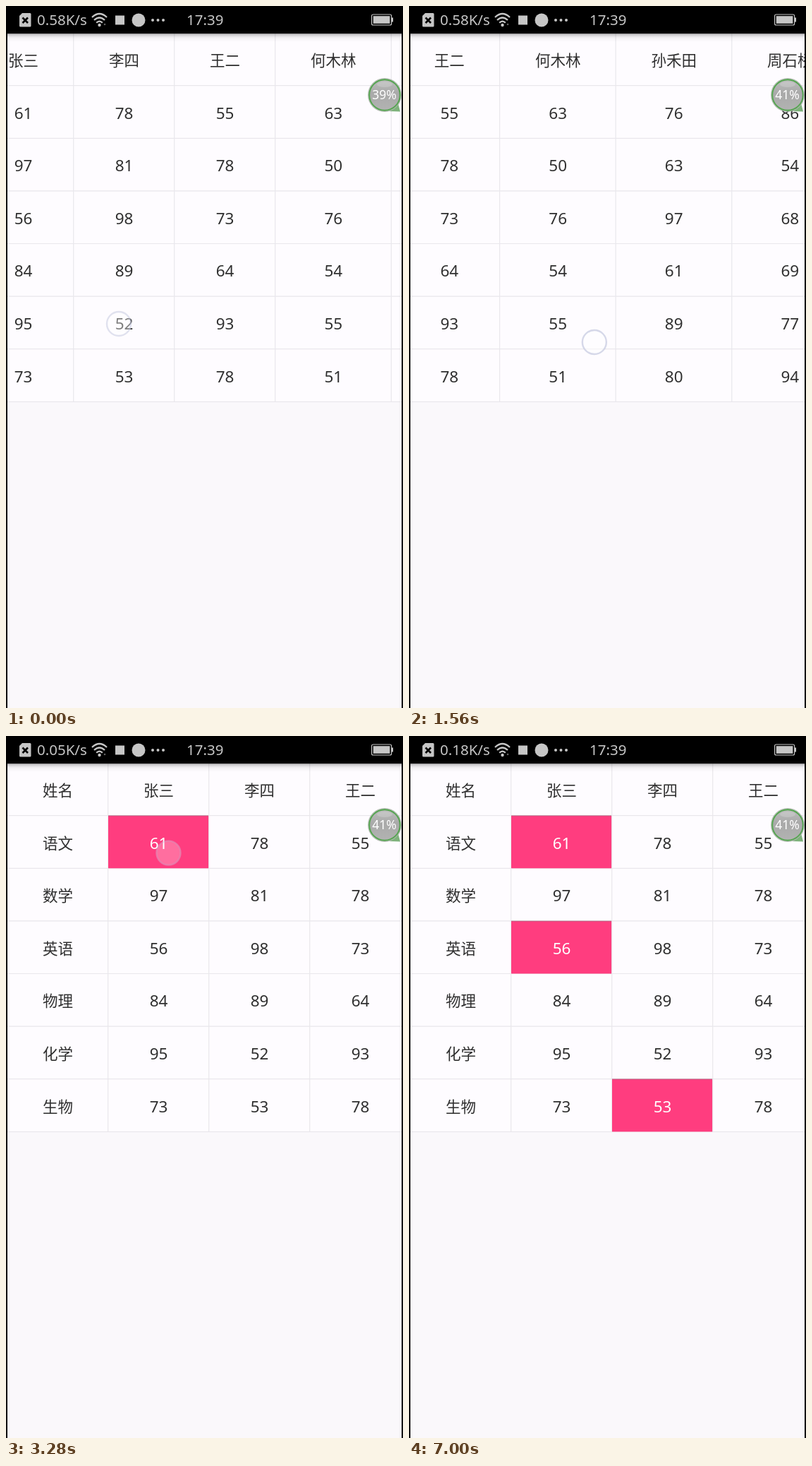
These frames come from a looping animation (563 px wide and 994 px high, 7.04 s). An HTML page:

```html
<!DOCTYPE html>
<html lang="zh-CN">
<head>
<meta charset="utf-8">
<title>成绩表</title>
<style>
  html, body { margin: 0; width: 100%; height: 100%; overflow: hidden; background: #000; }
  svg { display: block; width: 100%; height: 100%; }
  text { font-family: "Noto Sans", "Noto Sans CJK SC", sans-serif; font-weight: 300; }
  .zh { font-family: "Noto Sans CJK SC", "Noto Sans CJK", sans-serif; font-size: 21.5px; }
  .num { font-size: 22.5px; }
  .status { font-size: 20.5px; fill: #c6c6c6; }
</style>
</head>
<body>
<svg viewBox="0 0 563 994" preserveAspectRatio="none">
  <defs>
    <linearGradient id="shade" x1="0" y1="0" x2="0" y2="1">
      <stop offset="0" stop-color="#000" stop-opacity=".38"/>
      <stop offset=".2" stop-color="#000" stop-opacity=".16"/>
      <stop offset=".5" stop-color="#000" stop-opacity=".05"/>
      <stop offset="1" stop-color="#000" stop-opacity="0"/>
    </linearGradient>
    <linearGradient id="ball" x1="0" y1="0" x2="0" y2="1">
      <stop offset="0" stop-color="#bcbcbc"/>
      <stop offset=".45" stop-color="#a8a8a8"/>
      <stop offset="1" stop-color="#b2b2b2"/>
    </linearGradient>
    <clipPath id="page"><rect x="2" y="39" width="559" height="955"/></clipPath>
  </defs>
  <rect width="563" height="994"/>
  <g clip-path="url(#page)">
    <rect x="2" y="39" width="559" height="955" fill="#faf8fb"/>
    <g id="table"></g>
    <rect x="2" y="39" width="559" height="12" fill="url(#shade)"/>
    <g id="touch">
      <circle r="17" fill="#fff" fill-opacity=".5"/>
      <circle r="17" fill="none" stroke="#c9cce2" stroke-opacity=".75" stroke-width="2.4"/>
    </g>
  </g>

  <path d="M543 149Q552 145 556 138L559 149.500Z" fill="#7db27a"/>
  <circle cx="537" cy="126" r="24" fill="#acb4ab" fill-opacity=".85"/>
  <circle cx="537" cy="126" r="21.800" fill="url(#ball)" fill-opacity=".92" stroke="#55a550" stroke-width="1.900"/>
  <ellipse cx="537" cy="111" rx="11" ry="4" fill="#fff" fill-opacity=".18"/>
  <text id="percent" x="536.500" y="132.300" text-anchor="middle" font-size="17.500" fill="#fff"></text>

  <g fill="#c6c6c6">
    <path d="M23 10H34Q35.500 10 35.500 11.500V28Q35.500 29.500 34 29.500H20.500Q19 29.500 19 28V14Z"/>
    <path d="M23.500 16.500L31 24M31 16.500L23.500 24" stroke="#000" stroke-width="2.600"/>
    <path d="M122 16Q132.500 6 143 16M125 20Q132.500 13 140 20M128.200 23.800Q132.500 19.500 136.800 23.800"
      fill="none" stroke="#c6c6c6" stroke-width="2.300"/>
    <circle cx="132.500" cy="27" r="2.200"/>
    <circle cx="140" cy="26" r="1.300" opacity=".5"/>
    <rect x="155" y="13.500" width="13" height="13"/>
    <circle cx="188" cy="20" r="9.500"/>
    <path d="M208 20h.01m7.490 0h.01m7.490 0h.01" stroke="#c6c6c6" stroke-width="4" stroke-linecap="round"/>
    <rect x="518.600" y="12" width="28" height="15" rx="2" fill="none" stroke="#c6c6c6" stroke-width="1.200"/>
    <rect x="520.800" y="14.200" width="23.600" height="10.600"/>
    <rect x="547" y="16.500" width="2" height="6"/>
  </g>
  <text id="speed" class="status" x="44" y="27.300"></text>
  <text class="status" x="256" y="27.300">17:39</text>
</svg>
<script>
const LOOP = 7040, STEP = 40, LEFT = 2, HEAD = 39, TOP = 113, ROW = 74.6;
const FADE = 160, GLIDE = 0.1, START = 87.6, MAX_SCROLL = 506;
const PINK = '#ff3d7f', INK = '#2f2f2f';

const columns = [
  '姓名 语文 数学 英语 物理 化学 生物',
  '张三 61 97 56 84 95 73',
  '李四 78 81 98 89 52 53',
  '王二 55 78 73 64 93 78',
  '何木林 63 50 76 54 55 51',
  '孙禾田 76 63 97 61 89 80',
  '周石桥 86 54 68 69 77 94'
].map(line => line.split(' '));

// Drags as down time, lift time, start x, end x
const swipes = [
  [-240, -40, 260, 160],
  [200, 400, 308, 155],
  [720, 1000, 300, 170],
  [1480, 1760, 202, 415],
  [1920, 2080, 270.5, 368.5],
  [2240, 2600, 240, 392]
];

// Taps as time, column, row
const taps = [
  [3160, 1, 1], [3480, 1, 2], [3880, 1, 3], [4440, 1, 2],
  [4880, 2, 3], [5520, 2, 3], [5920, 2, 6]
];

const $ = id => document.getElementById(id);
const table = $('table'), touch = $('touch');
const clamp = (v, lo, hi) => Math.max(lo, Math.min(hi, v));
const rowTop = r => r ? TOP + (r - 1) * ROW : HEAD;
const cells = {};

function add(parent, tag, attrs, label = '') {
  const el = document.createElementNS('http://www.w3.org/2000/svg', tag);
  for (const key in attrs) el.setAttribute(key, attrs[key]);
  el.textContent = label;
  return parent.appendChild(el);
}

function addCell(c, r, x, width, label) {
  const y = rowTop(r), bottom = rowTop(r + 1);
  const cx = x + width / 2, cy = r ? y + ROW / 2 + 1.3 : 77;
  add(table, 'path', {
    d: `M${x - 0.3} ${y}V${bottom - 0.3}H${x + width}`,
    fill: 'none', stroke: '#e9e7ec', 'stroke-width': 1.2
  });
  const mark = add(table, 'g', {});
  add(mark, 'rect', { x, y: y - 0.3, width, height: ROW, fill: PINK });
  add(mark, 'rect', { x, y: y - 0.6, width, height: 1, fill: '#8d7580', opacity: 0.6 });
  const text = add(table, 'text', {
    x: cx, y: cy + 8, 'text-anchor': 'middle', class: isNaN(label) ? 'zh' : 'num'
  }, label);
  cells[[c, r]] = { mark, text, cx, cy };
}

let x = LEFT;
columns.forEach((column, c) => {
  const width = column[0].length < 3 ? 143 : 164.6;
  add(table, 'rect', { x, y: HEAD, width: width + 0.5, height: rowTop(7) - HEAD, fill: '#fefcff' });
  column.forEach((label, r) => addCell(c, r, x, width, label));
  x += width;
});

// The table follows each drag, then glides on by a share of its length
function scrollAt(t) {
  return swipes.reduce((offset, [down, lift, from, to]) => {
    const drag = clamp((t - down) / (lift - down), 0, 1);
    const rest = 1 - clamp((t - lift) / FADE, 0, 1);
    return clamp(offset + (from - to) * (drag + GLIDE * (1 - rest * rest)), 0, MAX_SCROLL);
  }, START);
}

function touchAt(t) {
  const active = (down, lift) => t >= down && t < lift + FADE;
  const swipe = swipes.find(([down, lift]) => active(down, lift));
  if (swipe) {
    const [down, lift, from, to] = swipe;
    const u = clamp((t - down) / (lift - down), 0, 1);
    return { x: from + (to - from) * u, y: 450 + t / 60, lift };
  }
  const tap = taps.find(([time]) => active(time, time + STEP));
  if (!tap) return null;
  const { cx, cy } = cells[[tap[1], tap[2]]];
  return { x: cx + 14, y: cy + 14, lift: tap[0] + STEP };
}

function drawTouch(t) {
  const spot = touchAt(t);
  touch.setAttribute('display', spot ? 'inline' : 'none');
  if (!spot) return;
  touch.setAttribute('transform', `translate(${spot.x} ${spot.y})`);
  touch.setAttribute('opacity', clamp(1 - (t - spot.lift) / FADE, 0, 1));
}

function drawCells(t) {
  const chosen = {};
  for (const [time, c, r] of taps) {
    if (t >= time + 2 * STEP) chosen[[c, r]] = !chosen[[c, r]];
  }
  for (const key in cells) {
    cells[key].mark.setAttribute('display', chosen[key] ? 'inline' : 'none');
    cells[key].text.setAttribute('fill', chosen[key] ? '#fff' : INK);
  }
}

function draw(t) {
  table.setAttribute('transform', `translate(${-scrollAt(t)} 0)`);
  drawCells(t);
  drawTouch(t);
  $('percent').textContent = t < 1000 ? '39%' : '41%';
  $('speed').textContent = t < 3000 ? '0.58K/s' : t < 7000 ? '0.05K/s' : '0.18K/s';
}

const start = performance.now();
function tick() {
  const t = (performance.now() - start) % LOOP;
  draw(Math.floor(t / STEP) * STEP);
  requestAnimationFrame(tick);
}
tick();
</script>
</body>
</html>
```
